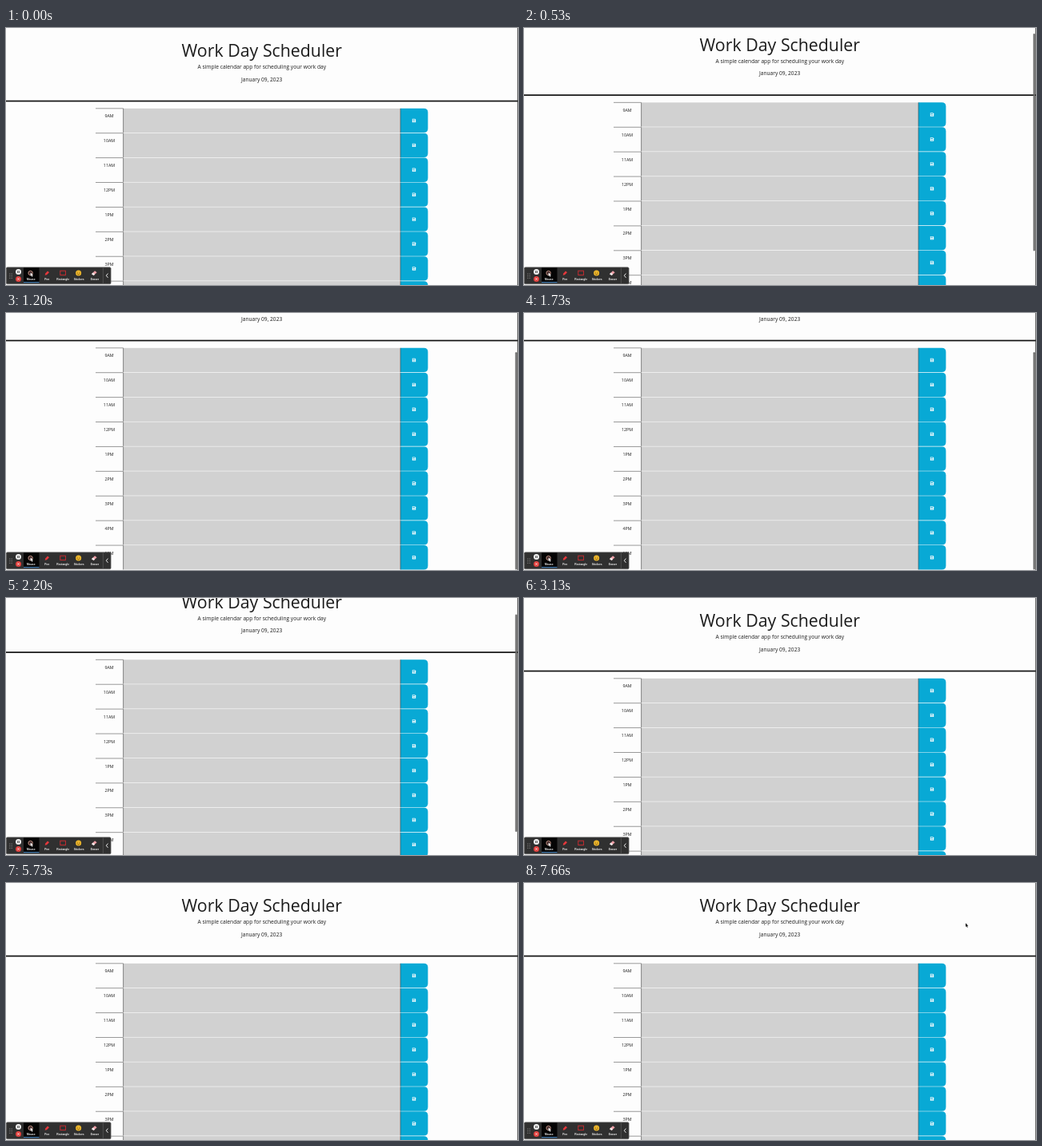
These frames come from a looping animation (640 by 322 pixels, 7730 ms). An HTML page:

```html
<!DOCTYPE html>
<html lang="en">
<head>
<meta charset="utf-8">
<title>Work Day Scheduler</title>
<style>
  html, body { margin: 0; width: 100%; height: 100%; overflow: hidden; background: #fdfdfd; }
  svg { display: block; width: 640px; height: 322px; }
  text { font-family: "Open Sans", sans-serif; fill: #1c1c1c; text-anchor: middle; }
  #toolbar text { font: bold 3.3px "Liberation Sans", Arial, sans-serif; fill: #eee; }
</style>
</head>
<body>
<svg viewBox="0 0 640 322">
  <defs>
    <g id="save">
      <path d="M-2.2-2.2H1.3L2.2-1.3V2.2H-2.2Z" fill="#f4fbfd"/>
      <path d="M-1.4-1.5H.9V-.4H-1.4Z" fill="#08a9d5"/>
      <circle cy="1" r=".7" fill="#08a9d5"/>
    </g>
    <path id="arrow" d="M0 0V4.6L1.1 3.7 1.9 5.5 2.8 5.1 2 3.4H3.4Z"/>
  </defs>

  <g id="page">
    <text x="319.8" y="36.2" font-size="21.33">Work Day Scheduler</text>
    <text x="319.8" y="51.2" font-size="6.67">A simple calendar app for scheduling your work day</text>
    <text x="319.6" y="66.8" font-size="6.67">January 09, 2023</text>
    <rect y="90.7" width="640" height="1.7" fill="#111"/>
    <g id="rows"></g>
  </g>

  <rect x="639.3" width=".7" height="322" fill="#333"/>
  <rect id="scrollbar" x="636.6" width="2.2" height="272.5" rx="1.1" fill="#666"/>

  <g id="toolbar">
    <rect x=".3" y="299.8" width="130.8" height="21" rx="1.5" fill="#303030" stroke="#6a6a6a" stroke-width=".6"/>
    <rect x="22" y="300.4" width="19.5" height="18.8" fill="#050505"/>
    <rect x="22" y="318.2" width="19.5" height="1" fill="#4b8fd0"/>
    <path d="M4.8 307.6V314M7.2 307.6V314" stroke="#999" stroke-width="1" stroke-dasharray="1 1.6"/>
    <circle cx="15.5" cy="305.6" r="3.5" fill="#f2f2f2"/>
    <path d="M14.7 304.2V307M16.3 304.2V307" stroke="#222" stroke-width=".8"/>
    <circle cx="15.5" cy="314.5" r="3.5" fill="#e2423f"/>
    <path d="M14.3 313.3L16.7 315.7M16.7 313.3L14.3 315.7" stroke="#fff" stroke-width=".8"/>
    <circle cx="30.6" cy="307" r="2.7" fill="#3a2020" stroke="#e0b0a0" stroke-width=".8"/>
    <use href="#arrow" x="30.6" y="306.2" fill="#fff"/>
    <path d="M48.7 309.8L49.2 307.6 52 304.4 54 306.2 51 309.2Z" fill="#e5383b"/>
    <rect x="67.8" y="304.2" width="6.6" height="5.4" fill="none" stroke="#d32b30" stroke-width=".9"/>
    <circle cx="90.6" cy="307" r="3.5" fill="#f5bd2c"/>
    <path d="M89.3 305.5V306.5M91.9 305.5V306.5M88.7 307.7Q90.6 310.2 92.5 307.7" fill="none" stroke="#5a3510" stroke-width=".7"/>
    <path d="M107 308.2L111 304.2 113.6 306.2 109.6 310Z" fill="#f0a0a8"/>
    <path d="M107 308.2L108.6 306.6 111.2 308.5 109.6 310Z" fill="#eee"/>
    <path d="M121.3 300.3V320.5" stroke="#666" stroke-width=".6"/>
    <path d="M127.4 307.6L125.3 310.2 127.4 312.8" fill="none" stroke="#fff" stroke-width=".9"/>
    <g id="tools"></g>
  </g>

  <use id="cursor" href="#arrow" fill="#111" stroke="#fff" stroke-width=".5" paint-order="stroke"/>
</svg>

<script>
const LOOP = 7730, FPS = 15, MAX_SCROLL = 57, ROW = 30.91;
const $ = id => document.getElementById(id);
const clamp = x => Math.min(1, Math.max(0, x));
const progress = (t, from, to) => clamp((t - from) / (to - from));

const hours = ['9AM', '10AM', '11AM', '12PM', '1PM', '2PM', '3PM', '4PM', '5PM'];
$('rows').innerHTML = hours.map((hour, i) => `
  <g transform="translate(0 ${100.5 + i * ROW})">
    <path d="M112 .3H146.5" stroke="#555" stroke-width=".6"/>
    <text x="129" y="11.9" font-size="5.33">${hour}</text>
    <rect x="146.5" y=".3" width="346.5" height="30.3" fill="#d1d1d1"/>
    <path d="M493 .3H522.3Q527.4 .3 527.4 5.3V25.6Q527.4 30.6 522.3 30.6H493Z" fill="#08a9d5"/>
    <path d="M146.6 .3V30.6M493 .3V30.6" stroke="#444" stroke-width=".6"/>
    <use href="#save" x="510" y="15.5"/>
  </g>`).join('');

const tools = [['Mouse', 31.3], ['Pen', 51.2], ['Rectangle', 71.2], ['Stickers', 91.2], ['Eraser', 111]];
$('tools').innerHTML = tools.map(([name, x]) => `<text x="${x}" y="315.8">${name}</text>`).join('');

function scrollAt(t) {
  if (t >= 1930) return MAX_SCROLL * (1 - progress(t, 1930, 2660)) ** 1.92;
  const u = progress(t, 60, 1200) ** 1.69;
  return MAX_SCROLL * u * u * (3 - 2 * u);
}

function cursorAt(t) {
  if (t >= 6730) return [552, 50.3];
  if (t >= 3600 && t < 5730) return [595.2, -2];
  return [-20, -20];
}

function draw(now) {
  const time = now % LOOP;
  const t = Math.floor((time + 6.7) * FPS / 1000) * 1000 / FPS;
  const scroll = scrollAt(t);
  $('page').setAttribute('transform', `translate(0 ${-scroll})`);
  $('scrollbar').setAttribute('y', .6 + scroll * .85);
  $('scrollbar').setAttribute('opacity', t < 60 ? 0 : 1 - progress(t, 2750, 3050));
  const [x, y] = cursorAt(time);
  $('cursor').setAttribute('x', x);
  $('cursor').setAttribute('y', y);
}

const start = performance.now();
function tick() {
  draw(performance.now() - start);
  requestAnimationFrame(tick);
}
tick();
</script>
</body>
</html>
```
